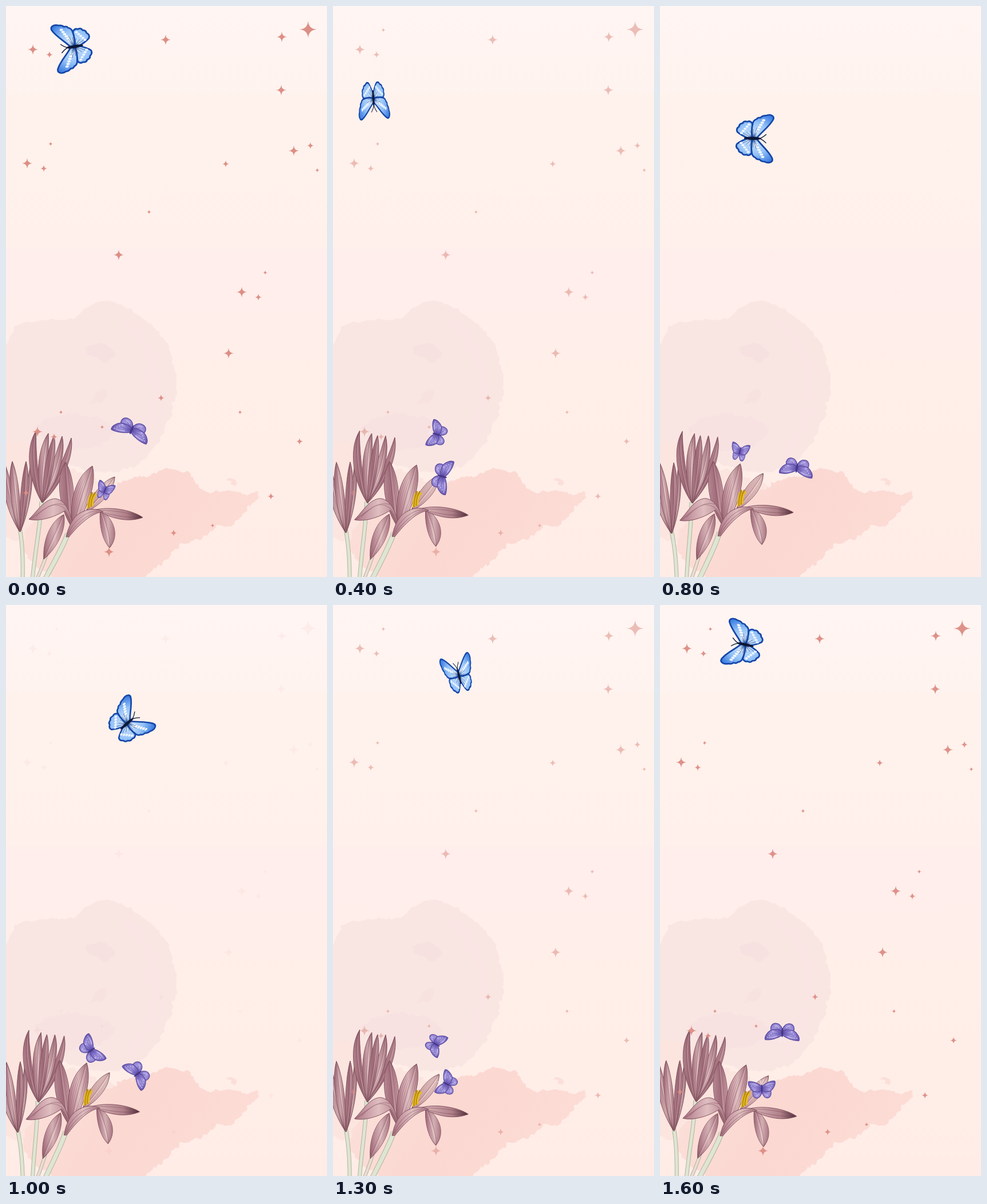
An HTML page for the animation above (1700 ms loop, 561 px wide and 998 px high).

```html
<!DOCTYPE html>
<html lang="en">
<head>
<meta charset="utf-8">
<title>Butterflies and crocuses</title>
<style>
html, body { margin: 0; width: 100%; height: 100%; overflow: hidden; background: #fff0eb; }
svg { position: absolute; left: 0; top: 0; width: 100%; height: 100%; display: block; }
</style>
</head>
<body>
<svg viewBox="0 0 561 998" preserveAspectRatio="none">
  <defs>
    <linearGradient id="paper" x2="0" y2="1">
      <stop offset="0" stop-color="#fff5f2"/>
      <stop offset=".15" stop-color="#fff3ef"/>
      <stop offset=".16" stop-color="#fff2ec"/>
      <stop offset=".42" stop-color="#fff0eb"/>
      <stop offset=".43" stop-color="#ffeeec"/>
      <stop offset=".55" stop-color="#ffeeea"/>
      <stop offset=".66" stop-color="#ffefe8"/>
      <stop offset="1" stop-color="#ffece7"/>
    </linearGradient>
    <linearGradient id="peach" x1="0" x2="1" y2=".3">
      <stop offset="0" stop-color="#fce1db"/>
      <stop offset=".5" stop-color="#fbd8d1"/>
      <stop offset="1" stop-color="#fcdcd5"/>
    </linearGradient>
    <filter id="rough" x="-5%" y="-5%" width="110%" height="110%">
      <feTurbulence type="fractalNoise" baseFrequency=".07" numOctaves="3" seed="4"/>
      <feDisplacementMap in="SourceGraphic" scale="13" xChannelSelector="R" yChannelSelector="G"/>
    </filter>
  </defs>
  <rect width="561" height="998" fill="url(#paper)"/>
  <g filter="url(#rough)">
    <path fill="#f9e6e3" d="M-20,600 L0,592 C10,570 18,553 40,552 C75,546 102,554 122,543 C145,520 168,514 192,519
      C214,525 232,541 249,553 C282,580 300,625 298,665 C296,715 270,765 238,797 C205,822 150,820 105,800
      C70,790 40,760 -20,768Z"/>
    <path fill="#f6e1e0" d="M138,600 C150,585 180,588 188,604 C188,628 172,626 160,616 C150,612 140,610 138,600Z"/>
    <path fill="#f8e2e0" d="M148,697 C152,676 172,664 178,670 C178,688 166,700 148,697Z"/>
    <path fill="#f7e2e1" d="M50,735 C90,705 150,705 190,738 C185,770 120,790 70,765Z"/>
    <path fill="none" stroke="#fae5e4" stroke-width="12" d="M205,550 C275,600 282,715 215,785"/>
    <path fill="#fce5df" d="M-20,775 C10,752 60,756 88,800 C130,815 165,830 190,842 L170,940 L-20,930Z"/>
    <path fill="url(#peach)" d="M28,935 C40,890 110,850 182,846 C200,832 225,822 250,821 C270,806 300,808 318,816
      C338,834 334,848 356,851 C388,848 418,853 443,850 C444,862 420,878 414,890 C400,904 386,914 366,910
      C352,934 322,934 300,946 C284,968 266,978 248,992 L236,1010 L95,1010 C70,990 35,975 28,935Z"/>
    <path fill="#fbdfd9" d="M384,829 C394,826 405,828 407,833 C402,839 395,836 392,833Z"/>
  </g>
</svg>
<svg viewBox="0 0 561 998" preserveAspectRatio="none">
  <defs>
    <linearGradient id="mauve">
      <stop offset="0" stop-color="#a5707e"/>
      <stop offset=".3" stop-color="#cb9fa8"/>
      <stop offset=".55" stop-color="#dfbec0"/>
      <stop offset="1" stop-color="#b27f8b"/>
    </linearGradient>
    <linearGradient id="dusk">
      <stop offset="0" stop-color="#bd8f99"/>
      <stop offset=".5" stop-color="#a67280"/>
      <stop offset="1" stop-color="#cb9fa7"/>
    </linearGradient>
    <linearGradient id="pale">
      <stop offset="0" stop-color="#cfa0a6"/>
      <stop offset="1" stop-color="#edd2cd"/>
    </linearGradient>
    <linearGradient id="tail">
      <stop offset="0" stop-color="#dcb8ba"/>
      <stop offset=".65" stop-color="#b08089"/>
      <stop offset="1" stop-color="#4c2c38"/>
    </linearGradient>
    <radialGradient id="sky" gradientUnits="userSpaceOnUse" cx="0" cy="0" r="50">
      <stop offset="0" stop-color="#34609f"/>
      <stop offset=".2" stop-color="#c3ddfb"/>
      <stop offset=".6" stop-color="#94c2f7"/>
      <stop offset="1" stop-color="#3f7fe2"/>
    </radialGradient>
    <radialGradient id="violet" gradientUnits="userSpaceOnUse" cx="0" cy="0" r="32">
      <stop offset="0" stop-color="#6553b2"/>
      <stop offset=".5" stop-color="#a497de"/>
      <stop offset="1" stop-color="#6a59b3"/>
    </radialGradient>
  </defs>
  <g id="plant"></g>
  <g id="stars" fill="#dd8f86"></g>
  <g id="flyers"></g>
</svg>
<script>
const LOOP = 1700, STEP = 100;
const $ = id => document.getElementById(id);
const path = (d, attrs) => `<path d="${d}" ${attrs}/>`;

// A leaf-shaped petal from base to tip with fine veins; bend shifts it sideways.
function petal(x0, y0, x1, y1, w, bend = 0, fill = 'mauve') {
  const dx = x1 - x0, dy = y1 - y0, len = Math.hypot(dx, dy);
  const at = (f, off) => {
    const px = x0 + dx * f - dy / len * off, py = y0 + dy * f + dx / len * off;
    return px.toFixed(1) + ',' + py.toFixed(1);
  };
  const side = off => `C${at(.35, off)} ${at(.78, off)} ${x1},${y1}`;
  const back = off => `C${at(.78, off)} ${at(.35, off)} ${x0},${y0}`;
  let s = path(`M${x0},${y0}${side(bend + w)}${back(bend - w)}Z`,
    `fill="url(#${fill})" stroke="#7c4a59" stroke-width=".9"`);
  for (let k = -.75; k < 1; k += .25)
    s += path(`M${x0},${y0}${side(bend + w * k)}`,
      `fill="none" stroke="${k === .25 ? '#f6e2df' : '#74424f'}" stroke-width="${k ? .7 : 1.3}" opacity=".45"`);
  return s;
}

const stem = (d, w, color = '#dfe5d3') =>
  path(d, `fill="none" stroke="#a9b096" stroke-width="${w}"`) +
  path(d, `fill="none" stroke="${color}" stroke-width="${w - 1.8}"`);

const shape = (d, fill, veins) =>
  path(d, `fill="url(#${fill})" stroke="#7c4a59" stroke-width=".9"`) +
  path(veins, 'fill="none" stroke="#74424f" stroke-width="1" opacity=".45"');

function drawPlant() {
  let s = stem('M24,912 C29,940 30,970 29,1004', 7) +
    stem('M62,866 C60,910 51,950 46,1004', 7) +
    stem('M72,955 Q66,975 53,1004', 6, '#ecdcd2') +
    stem('M108,922 C100,945 85,970 67,1004', 9);
  // left bud
  s += petal(24, 919, -2, 800, 10, -6) + petal(25, 919, 43, 801, 6, 5) +
    petal(25, 919, 35, 796, 8, 2, 'dusk') + petal(24, 919, 11, 796, 10, -2);
  // tall bud
  s += petal(63, 868, 53, 742, 9, -13, 'dusk') + petal(64, 868, 114, 755, 8, 10, 'dusk') +
    petal(63, 868, 98, 752, 9, 7) + petal(63, 868, 74, 747, 10, -6) +
    petal(64, 868, 84, 751, 9, 1, 'dusk');
  // closed bud
  s += petal(66, 967, 101, 889, 15, -1);
  // open bloom
  s += petal(140, 884, 190, 823, 13, 1, 'pale') +
    petal(113, 908, 104, 797, 16, -3, 'dusk') + petal(117, 912, 151, 804, 19, -3);
  for (let i = 0; i < 5; i++)
    s += path(`M${143 + i * 2},${877 - i} Q${144 + i * 2},${862 - i} ${148 + i * 2.4},${854 - i % 2 * 3}`,
      `fill="none" stroke="${i % 2 ? '#b98b12' : '#e8bd22'}" stroke-width="3" stroke-linecap="round"`);
  s += shape('M118,912 C114,890 106,863 86,861 C66,862 56,882 40,897 C58,902 86,893 103,882 C108,888 112,900 118,912Z',
    'mauve', 'M116,905 C108,878 98,872 84,872 C68,875 58,887 42,897 M103,872 C84,866 70,876 52,892');
  s += petal(165, 880, 181, 947, 15, -6);
  s += shape('M158,880 C188,874 224,883 239,894 C214,903 184,897 158,880Z',
    'tail', 'M162,881 Q205,882 237,893 M165,884 Q198,894 232,894');
  s += shape('M105,928 C110,906 119,890 134,884 C148,877 161,879 170,884 C149,886 128,906 110,928Z',
    'mauve', 'M107,926 C118,900 138,884 160,882 M109,925 C124,904 142,888 164,883');
  $('plant').innerHTML = s;
}

const star = (x, y, r) => path('M0,-1 Q.07,-.07 1,0 Q.07,.07 0,1 Q-.07,.07 -1,0 Q-.07,-.07 0,-1Z',
  `transform="translate(${x} ${y}) scale(${r})"`) + `<circle cx="${x}" cy="${y}" r="${r * .17}"/>`;

// Three stars of falling size; flip turns the group upside down.
const trio = (x, y, flip = 1) =>
  star(x, y, 9) + star(x + 29, y + 9 * flip, 6) + star(x + 41, y - 34 * flip, 4);

function drawStars() {
  const singles = {
    15: '528,41',
    9: '279,59 482,54 481,147 197,435 389,607 180,954',
    6: '384,276 271,685 513,761 463,857 293,921 35,851',
    4: '250,360 409,710 168,736 361,908'
  };
  let s = trio(47, 76) + trio(37, 275) + trio(503, 253, -1) + trio(412, 500) + trio(55, 744);
  for (const [size, spots] of Object.entries(singles))
    for (const spot of spots.split(' ')) s += star(...spot.split(',').map(Number), +size);
  $('stars').innerHTML = s;
}

const mirror = half => half + `<g transform="scale(-1 1)">${half}</g>`;

function blueArt() {
  const edge = 'fill="url(#sky)" stroke="#1546a8" stroke-width="2.8" stroke-linejoin="round"';
  let half = path('M0,2 L-27,2 Q-33,6 -30,11 Q-32,17 -27,19 Q-26,25 -21,25 Q-17,31 -11,28 Q-4,20 0,8Z', edge) +
    path('M0,-6 C-10,-12 -22,-28 -35,-34 C-42,-37 -46,-29 -42,-21 Q-42,-15 -38,-12 Q-39,-7 -35,-5 Q-34,-1 -29,1 C-20,3 -8,3 0,1Z', edge);
  for (let i = 0; i < 6; i++) {
    half += `<ellipse cx="${-12 - i * 4.3}" cy="${-6 - i * 2.3}" rx="2" ry="3" fill="#f4faff"/>`;
    if (i < 5) half += `<ellipse cx="${-25 + i * 4}" cy="${8 + i * 3.2}" rx="2" ry="2.6" fill="#eff6ff"/>`;
    half += path(`M0,0 L${-22 + i * 2.6},${-12 + i * 6}`, 'stroke="#173a80" stroke-width=".8" opacity=".75"');
  }
  half += path('M0,-12 Q-3,-18 -8,-23', 'fill="none" stroke="#0c1838" stroke-width="1.4"');
  return mirror(half) + '<ellipse cy="1" rx="2.8" ry="15" fill="#0c1838"/>';
}

function violetArt() {
  const edge = 'fill="url(#violet)" stroke="#5b4a9f" stroke-width="1.4" stroke-linejoin="round"';
  let half = path('M0,2 L-19,2 C-23,8 -20,16 -12,16 C-6,16 -2,11 0,6Z', edge) +
    path('M0,-4 C-8,-10 -21,-14 -30,-13 C-32,-8 -27,0 -20,4 C-13,6 -5,5 0,3Z', edge);
  for (let i = 0; i < 4; i++)
    half += path(`M-2,${i - 2} L${-23 + i * 4},${-9 + i * 6.5}`, 'stroke="#51419a" stroke-width=".8" opacity=".6"') +
      `<circle cx="${-26 + i * 3}" cy="${-9 + i * 3.6}" r="1" fill="#cfc6f2"/>`;
  half += path('M-9,-6 Q-17,-9 -24,-9 M-6,8 Q-10,12 -14,12', 'fill="none" stroke="#c6bcee" stroke-width="2.2" opacity=".7"') +
    path('M0,-7 Q-2,-12 -5,-16', 'fill="none" stroke="#f6eefa" stroke-width="1.2"');
  return mirror(half) + '<ellipse rx="1.8" ry="8" fill="#463785"/>';
}

// Paths are a centre plus two harmonics: [centre, cos, sin, cos 2, sin 2].
// Each butterfly turns once per loop while its wings flap a few times.
const FLYERS = [
  { art: violetArt, x: [178.5, 39.5, 0, 1.5, 4], y: [760, -19, -9, 0, -3],
    heading: 203, spin: 1, flap: { mid: .8, depth: -.3, beats: 3, lag: .47 } },
  { art: violetArt, x: [202, -33, -3, 4, -4], y: [828, 18, -8, 0, 3],
    heading: 20, spin: 1, flap: { mid: .78, depth: -.32, beats: 3, lag: .07 } },
  { art: blueArt, x: [148, -29, -75, 0, 0], y: [150, -79, 20, 0, 0],
    heading: -99, spin: -1, flap: { mid: .79, depth: .18, beats: 2, lag: 0 } }
];

const wave = ([c, a, b, a2, b2], p) =>
  c + a * Math.cos(p) + b * Math.sin(p) + a2 * Math.cos(2 * p) + b2 * Math.sin(2 * p);

drawPlant();
drawStars();
$('flyers').innerHTML = FLYERS.map(f => `<g>${f.art()}</g>`).join('');
const nodes = [...$('flyers').children];

function render(ms) {
  const turn = Math.floor(ms % LOOP / STEP) * STEP / LOOP;
  const phase = turn * 2 * Math.PI;
  const glow = (1 + Math.cos(phase)) / 2;
  $('stars').setAttribute('opacity', glow.toFixed(3));
  $('plant').setAttribute('transform', `rotate(${(-3.15 * (1 - glow)).toFixed(3)} 75 998)`);
  FLYERS.forEach(({ x, y, heading, spin, flap }, i) => {
    const angle = heading + spin * turn * 360;
    const spread = flap.mid + flap.depth * Math.cos(2 * Math.PI * (flap.beats * turn - flap.lag));
    nodes[i].setAttribute('transform',
      `translate(${wave(x, phase)} ${wave(y, phase)}) rotate(${angle}) scale(${spread} 1)`);
  });
}

function tick() {
  render(performance.now());
  requestAnimationFrame(tick);
}
tick();
</script>
</body>
</html>
```
